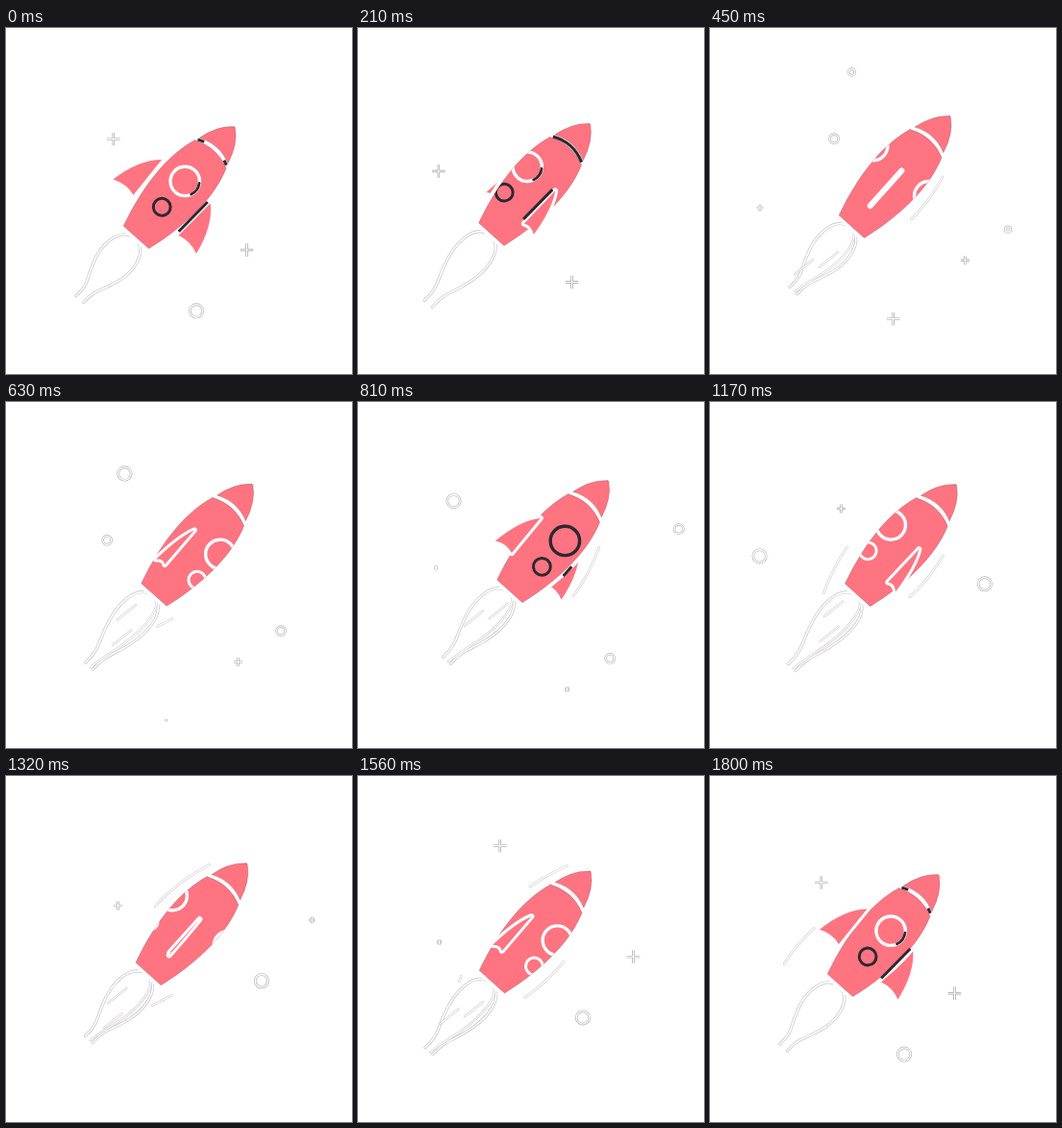
These frames come from a looping animation (360 px wide and 360 px high, 1.83 s). An HTML page with a canvas:

```html
<!DOCTYPE html>
<html lang="en">
<head>
<meta charset="utf-8">
<title>Rocket</title>
<style>
html, body { margin: 0; width: 100%; height: 100%; overflow: hidden; background: #fff; }
canvas { display: block; width: 360px; height: 360px; }
</style>
</head>
<body>
<canvas id="stage"></canvas>
<script>
const LOOP = 1830, STEP = 30, TAU = Math.PI * 2;
const TILT = 0.7295;
const WHITE = '#fff', RED = '#ff7480', DARK = '#2c2932';
const canvas = document.getElementById('stage');
const dpr = window.devicePixelRatio || 1;
canvas.width = canvas.height = 360 * dpr;
const c = canvas.getContext('2d');

function stroke(path, color, width) {
  c.strokeStyle = color;
  c.lineWidth = width;
  c.stroke(path);
}

function fill(path) {
  c.fillStyle = RED;
  c.fill(path);
}

// White line with a faint grey edge
function ghost(path, edge = '#c4c0c4', width = 3) {
  stroke(path, edge, width);
  stroke(path, WHITE, width - 1.3);
}

function circle(x, y, r, from = 0, to = TAU) {
  const p = new Path2D();
  p.arc(x, y, r, from, to);
  return p;
}

// Rocket space: nose tip at 0,0 with the tail downwards
const NOSE = new Path2D('M-1 .5Q0-.6 1 .5Q14.5 11 20 33Q0 23.5-20 33Q-14.5 11-1 .5Z');
const BODY = new Path2D('M-22 38Q0 27.5 22 38C32 66 32 105 17.7 154L-17.7 154C-32 105-32 66-22 38Z');
const SEAM = new Path2D('M-20 35.5Q0 25.5 20 35.5');

const stars = [
  { x: 343, y: 121, birth: 740, ring: true, big: true },
  { x: 154, y: 38, birth: 400, ring: true, big: true },
  { x: 165, y: 52, birth: 1430, big: true },
  { x: 325, y: 142, birth: 1270, big: true },
  { x: 159, y: 84, birth: 1000 },
  { x: 292, y: 210, birth: 250 },
  { x: 318, y: 200, birth: 390, ring: true },
  { x: 161, y: 77, birth: 210, ring: true }
];

function drawStars(time) {
  for (const { x: x0, y: y0, birth, ring, big } of stars) {
    const age = (time - birth + LOOP) % LOOP;
    const life = !big ? 620 : x0 > 180 ? 1200 : 900;
    const s = (big ? 6.7 : 4.5) * Math.min(1, age / 100, (life - age) / 100);
    if (s <= 0) continue;
    const x = x0 - .133 * age, y = y0 + .159 * age;
    if (ring) ghost(circle(x, y, s), '#b5b0b4', 2.6);
    else ghost(new Path2D(`M${x - s} ${y}H${x + s}M${x} ${y - s}V${y + s}`), '#a39ea3', 2.4);
  }
}

// A line of air sliding down the hull, pushed out by the fins
function drawStreak(side, age, length, spread) {
  const head = 10 + .6 * age;
  const from = Math.max(12, head - length), to = Math.min(176, head);
  if (to <= from) return;
  const p = new Path2D();
  for (let i = 0; i <= 8; i++) {
    const y = from + (to - from) * i / 8;
    const hull = 41.5 - .0027 * (y - 97) ** 2;
    p.lineTo(side * (hull + spread * Math.max(0, y - 50)), y);
  }
  ghost(p, '#d2ced1', 2.6);
}

function drawStreaks(t, v) {
  const spread = .3 * Math.max(0, 1 - 3.3 * Math.abs(v));
  for (let i = 0; i < 3; i++) drawStreak(-1, t - 863 - 312 * i, 70, spread);
  for (let i = 0; i < 4; i++) drawStreak(1, t - 288 - 350 * i, 55, spread);
}

function drawFlame(t) {
  const beat = TAU * t / LOOP;
  const end = 249 - 5 * Math.cos(4 * beat) - 3 * Math.cos(beat);
  const mid = 156 + (end - 156) * .6;
  const side = (s, wide, tip) => new Path2D(
    `M${s * 4} 156C${s * 19 * wide} 160 ${s * 24 * wide} 184 ${s * 14 * wide} ${mid}` +
    `C${s * 10 * wide} ${mid + 13} ${s * 4} ${end - 18} ${s * tip} ${end}`);
  ghost(side(-1, 1, 6));
  ghost(side(1, 1, 4.5));
  if (t < 220 || t > 1700) return;
  ghost(side(1, .72, 1), '#d2ced1', 2.4);
  for (const s of [-1, 1]) {
    const y = 162 + 45 * ((t / LOOP * 3 + s / 4 + .5) % 1);
    ghost(new Path2D(`M${s * 7} ${y}L${s * 7 - 4} ${y + 24}`), '#d2ced1', 2.4);
  }
}

function drawFin(side, v, front) {
  const open = Math.max(0, 1 - 2.2 * Math.abs(v)) ** .8;
  const inner = 34 * open, outer = 58 * open;
  const p = new Path2D(`M${side * inner} 76Q${side * 52 * open} 92 ${side * outer} 125` +
    `Q${side * 45 * open} 119 ${side * 31.5 * open} 123Z`);
  if (front) stroke(p, WHITE, 6);
  fill(p);
  return inner;
}

function drawWindows(v, inked) {
  c.save();
  c.clip(BODY);
  for (const turn of [v - 1, v, v + 1]) {
    const x = -78 * turn - 1;
    const full = inked && turn < -.06;
    stroke(circle(x, 76.6, 15.2), full ? DARK : WHITE, 3.4);
    if (inked && !full) stroke(circle(x, 76.6, 15, -.6, .4), DARK, 2.8);
    stroke(circle(x, 112.6, 8.9), inked ? DARK : WHITE, 3);
  }
  c.restore();
}

function drawInk(v, inner) {
  c.lineCap = 'butt';
  const slot = v < -.05 ? 'M31 92V105' : `M${inner - 3} 77L${inner - 5} 120`;
  stroke(new Path2D(slot), DARK, 3);
  if (v < -.06) return;
  if (v < .06) c.setLineDash([7, 29, 9, 99]);
  stroke(SEAM, DARK, 3);
  c.setLineDash([]);
}

// v is the turn of the hull: 0 with a window in front, ±.5 with a fin in front
function drawRocket(v) {
  const inked = v > -.2 && v < .25;
  const near = v < 0 ? -1 : 1;
  drawFin(-near, v, false);
  stroke(BODY, WHITE, 8);
  for (const part of [BODY, NOSE]) {
    fill(part);
    stroke(part, 'rgba(70,40,50,.35)', .6);
  }
  drawWindows(v, inked);
  const inner = drawFin(near, v, true);
  if (inked) drawInk(v, inner);
}

function draw(t) {
  c.setTransform(dpr, 0, 0, dpr, 0, 0);
  c.fillStyle = WHITE;
  c.fillRect(0, 0, 360, 360);
  c.lineCap = 'butt';
  c.lineJoin = 'round';
  drawStars(t);

  const half = t / (LOOP / 2) % 1;
  const v = half > .5 ? half - 1 : half;
  const lift = 1 - Math.cos(TAU * (t + 20) / LOOP);
  c.translate(238 + 11.5 * lift, 103 - 10.7 * lift);
  c.rotate(TILT);
  c.lineCap = 'round';
  drawFlame(t);
  drawStreaks(t, v);
  drawRocket(v);
}

const start = performance.now();
function tick() {
  const t = Math.max(0, performance.now() - start) % LOOP;
  draw(Math.floor(t / STEP) * STEP);
  requestAnimationFrame(tick);
}
tick();
</script>
</body>
</html>
```
